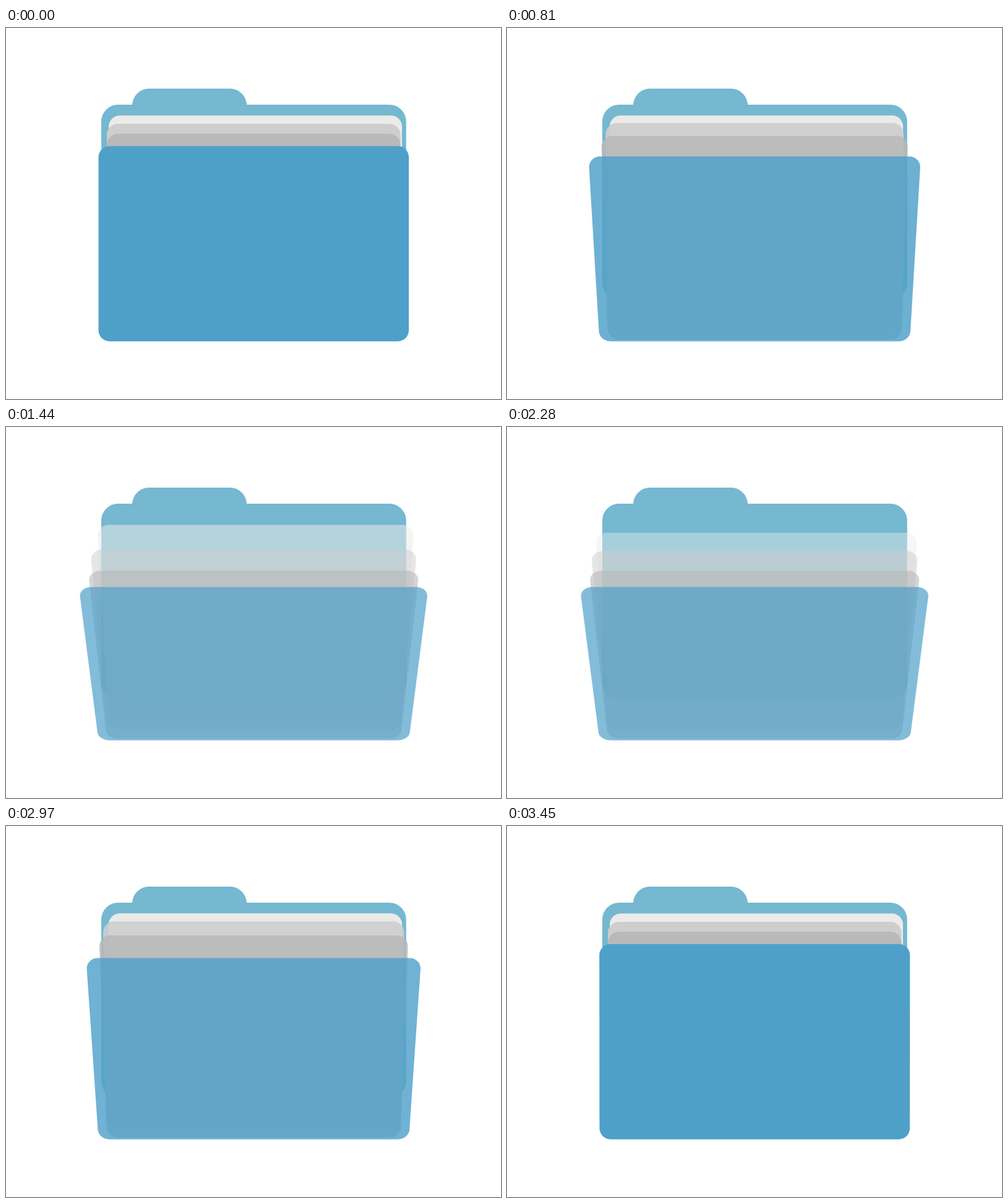
Recreate the animation shown at these times as an HTML page with a canvas. Size 800 px wide and 600 px high, loop 3990 ms.

```html
<!DOCTYPE html>
<html lang="en">
<head>
<meta charset="utf-8">
<title>Folder</title>
<style>
html, body { margin: 0; width: 100%; height: 100%; overflow: hidden; background: #fff; }
canvas { display: block; }
</style>
</head>
<body>
<canvas id="stage" width="800" height="600"></canvas>
<script>
const ctx = document.getElementById('stage').getContext('2d');
const LOOP = 3990, STEP = 30;
const DEPTH = 1800, EYE_X = 400.5, EYE_Y = 313;

// Sheets from back to front; open and close are [start, duration] in ms.
const sheets = [
  { x0: 166, x1: 640, y0: 141.5, y1: 475, color: '#ebebe9',
    angle: 29.5, alpha: 0.42, open: [752, 1000], close: [2220, 800] },
  { x0: 163, x1: 637.5, y0: 155, y1: 489, color: '#cecece',
    angle: 34, alpha: 0.5, open: [545, 1000], close: [2316, 1000] },
  { x0: 163, x1: 637.5, y0: 171, y1: 504, color: '#b9b9b9',
    angle: 38, alpha: 0.6, open: [385, 1000], close: [2428, 1000] },
  { x0: 149.5, x1: 651, y0: 191, y1: 506.7, color: '#4fa0c9',
    angle: 40, alpha: 0.7, open: [280, 1000], close: [2560, 950] }
];

function ease(x) {
  x = Math.min(1, Math.max(0, x));
  return x < 0.5 ? 2 * x * x : 1 - 2 * (1 - x) * (1 - x);
}

const ramp = (t, [start, length]) => ease((t - start) / length);

// Tilt a point about the sheet's lower edge, then project it.
function project(x, y, hinge, angle) {
  const h = hinge - y;
  const k = DEPTH / (DEPTH - h * Math.sin(angle));
  return [
    EYE_X + (x - EYE_X) * k,
    EYE_Y + (hinge - h * Math.cos(angle) - EYE_Y) * k
  ];
}

function drawSheet(s, t) {
  const p = ramp(t, s.open) - ramp(t, s.close);
  const angle = s.angle * p * Math.PI / 180;
  const r = 18, n = 12;
  const corners = [
    [s.x0 + r, s.y0 + r], [s.x1 - r, s.y0 + r],
    [s.x1 - r, s.y1 - r], [s.x0 + r, s.y1 - r]
  ];
  ctx.beginPath();
  corners.forEach(([cx, cy], i) => {
    for (let j = 0; j <= n; j++) {
      const a = Math.PI + (i + j / n) * Math.PI / 2;
      ctx.lineTo(...project(cx + r * Math.cos(a), cy + r * Math.sin(a), s.y1, angle));
    }
  });
  ctx.closePath();
  ctx.globalAlpha = 1 - p * (1 - s.alpha);
  ctx.fillStyle = s.color;
  ctx.fill();
  ctx.globalAlpha = 1;
}

function drawBack() {
  ctx.fillStyle = '#75b8d0';
  ctx.beginPath();
  ctx.roundRect(154, 124, 492.7, 316, 27);
  ctx.fill();
  ctx.beginPath();
  ctx.roundRect(204, 98, 185, 32, [27, 27, 0, 0]);
  ctx.fill();
}

function frame(now) {
  const t = Math.floor((now % LOOP) / STEP) * STEP;
  ctx.fillStyle = '#fff';
  ctx.fillRect(0, 0, 800, 600);
  drawBack();
  for (const s of sheets) drawSheet(s, t);
}

let begin = null;
function tick(now) {
  if (begin === null) begin = now;
  frame(now - begin);
  requestAnimationFrame(tick);
}
frame(0);
requestAnimationFrame(tick);
</script>
</body>
</html>
```
